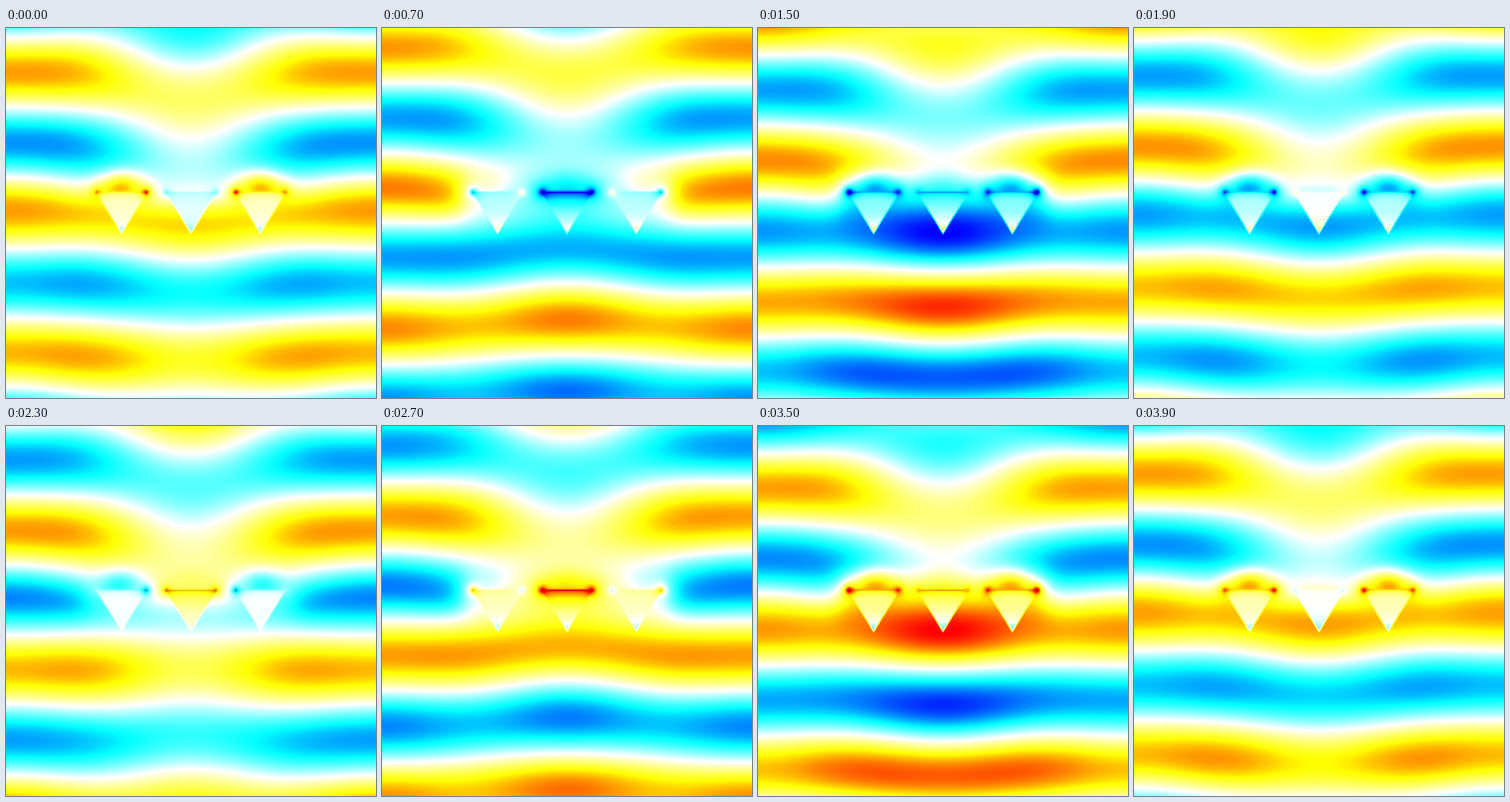
These frames come from a looping animation (400 by 400 pixels, 4 s). A matplotlib script:

```python
import numpy as np
import matplotlib.pyplot as plt
from matplotlib.animation import FuncAnimation
from matplotlib.colors import LinearSegmentedColormap

SIZE, FRAMES, INTERVAL = 400, 40, 100
WAVELENGTH = 152
K = 2 * np.pi / WAVELENGTH
CENTERS = (125, 200, 275)
TOP, TIP, HALF = 177, 222, 28      # triangle geometry

x, y = np.meshgrid(np.arange(SIZE) + 0.5, np.arange(SIZE) + 0.5)


def polar(size, degrees):
    return size * np.exp(1j * np.radians(degrees))


def bump(d, width):
    return np.exp(-(d / width) ** 2)


def sigmoid(d):
    return 1 / (1 + np.exp(-d))


def mix(a, b, weight):
    return a + (b - a) * weight


def orders(coefs, y0, direction):
    """Diffraction orders of a row that repeats every SIZE pixels."""
    total = 0
    for m, c in enumerate(coefs):
        kx = 2 * np.pi * m / SIZE
        ky = np.sqrt(K ** 2 - kx ** 2)
        total = total + c * np.cos(kx * (x - 200)) * np.exp(1j * direction * ky * (y - y0))
    return total


def far_field():
    """Transmitted orders above the row, incident plus reflected below."""
    above = orders((polar(0.321, 49), polar(0.235, -90), polar(0.069, -98)), 75, 1)
    below = orders((0.45,), 200, 1)
    below = below + orders((polar(0.08, -100), polar(0.1, -105), polar(0.05, -70)), 300, -1)
    return mix(above, below, sigmoid((y - 190) / 8))


def near_field():
    """Extra field hugging the row."""
    row = sigmoid((112 - abs(x - 200)) / 8)
    field = polar(0.45, 88) * row * bump(y - 183, 25)
    for cx in CENTERS:
        peak = 0.12j if cx == 200 else 0.43 + 0.13j
        field = field + peak * bump(x - cx, 25) * bump(y - 170, 16)
    return field


def add_triangle(field, cx):
    middle = cx == 200
    dx = x - cx
    depth = np.clip((y - TOP) / (TIP - TOP), 0, 1)

    # values down the axis, from the top edge to the tip
    stops = (0, 0.2, 0.5, 0.75, 1)
    if middle:
        re = (-0.08, -0.05, -0.03, -0.05, -0.17)
        im = (0.58, 0.36, 0.18, 0.05, -0.24)
        edge = -0.1 + 0.8j
        left = right = -0.2 + 0.82j
    else:
        re = (0.18, 0.08, 0.07, 0.03, -0.17)
        im = (0.24, 0.15, 0.12, 0.03, -0.24)
        edge = 0.32 + 0.32j
        outer, inner = 0.52 + 0.78j, 0.74 + 0.25j
        left, right = (outer, inner) if cx < 200 else (inner, outer)
    inside = np.interp(depth, stops, re) + 1j * np.interp(depth, stops, im)

    half = HALF * (TIP - y) / (TIP - TOP)
    cover = np.clip((half - abs(dx)) / 3 + 0.5, 0, 1) * (y > TOP)
    field = mix(field, inside, cover)

    line = np.exp(-abs(y - TOP - 0.5) / 1.1) * sigmoid(HALF - abs(dx))
    field = mix(field, edge, 0.85 * line)
    for side, value in ((-1, left), (1, right)):
        d = np.hypot(dx - side * (HALF - 1.5), y - TOP - 0.5)
        field = mix(field, value, np.exp(-d / 4))
    return field


def amplitude():
    field = far_field() + near_field()
    for cx in CENTERS:
        field = add_triangle(field, cx)
    return field


wave = amplitude()
cmap = LinearSegmentedColormap.from_list("field", [
    (0, 0, 0.5), (0, 0, 1), (0, 1, 1), (1, 1, 1),
    (1, 1, 0), (1, 0, 0), (0.5, 0, 0)], N=768)

fig = plt.figure(figsize=(4, 4), dpi=100)
ax = fig.add_axes([0, 0, 1, 1])
ax.axis("off")
image = ax.imshow(wave.real, cmap=cmap, vmin=-1, vmax=1,
                  interpolation="nearest", aspect="auto")


def draw(i):
    image.set_data((wave * np.exp(2j * np.pi * i / FRAMES)).real)
    return [image]


anim = FuncAnimation(fig, draw, frames=FRAMES, interval=INTERVAL,
                     repeat=True, repeat_delay=0)
plt.show()
```
